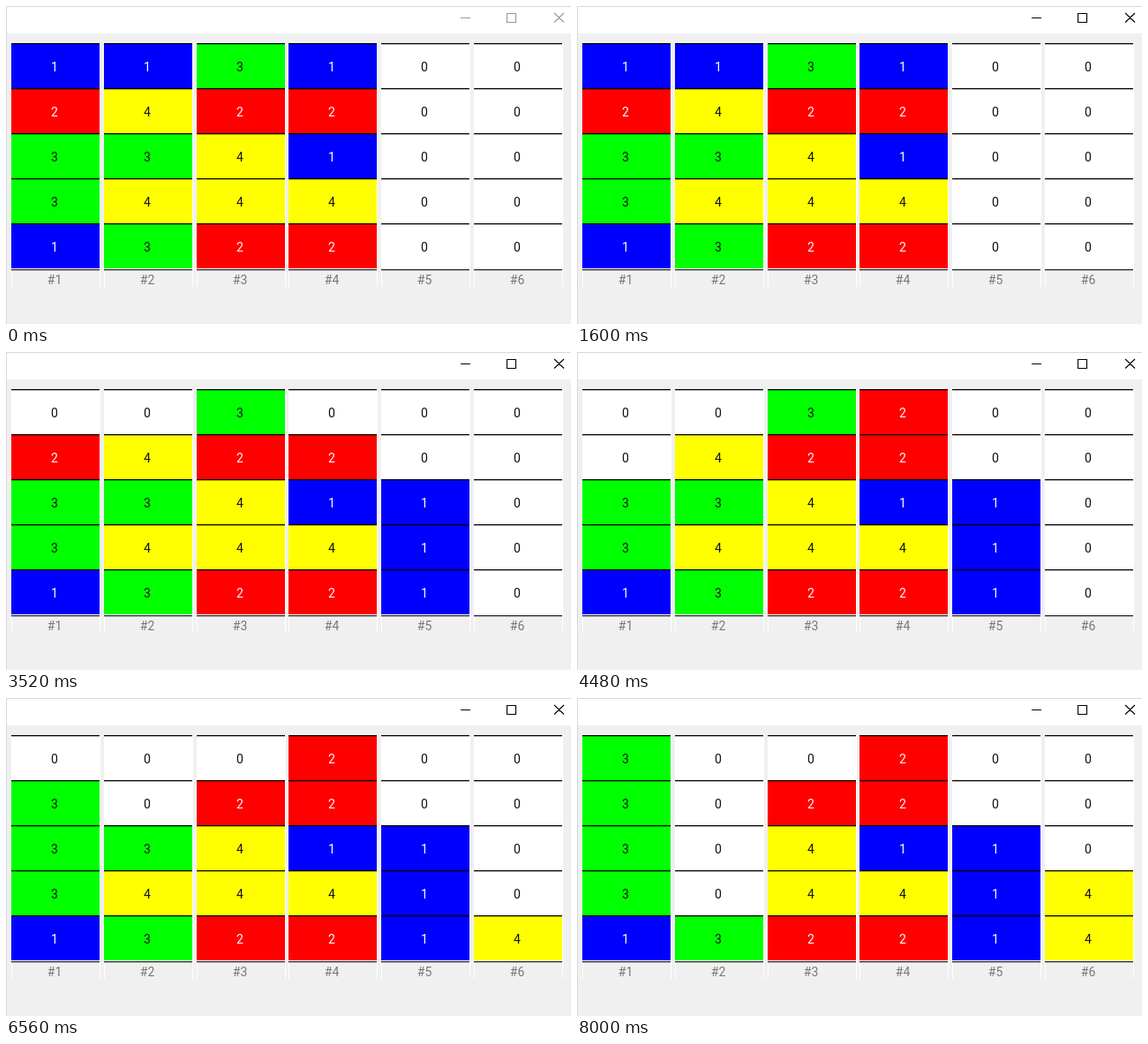
An HTML page with a canvas for the animation above (8080 ms loop, 640 px wide and 360 px high).

```html
<!DOCTYPE html>
<html lang="en">
<head>
<meta charset="utf-8">
<title>Colour sorting tubes</title>
<style>
  html, body { margin: 0; width: 100%; height: 100%; overflow: hidden; background: #f0f0f0; }
  canvas { display: block; }
</style>
</head>
<body>
<canvas id="stage" width="640" height="360"></canvas>
<script>
const ctx = document.getElementById('stage').getContext('2d');

const LOOP = 8080;
const ACTIVATE_AT = 1360;
const ROWS = 5;
const COLORS = ['#fff', '#00f', '#f00', '#0f0', '#ff0'];

// Each tube is listed from top to bottom; 0 is an empty slot.
const START = ['12331', '14343', '32442', '12142', '00000', '00000'];

// [time, source tube, destination tube]
const MOVES = [
  [1680, 0, 4], [2560, 1, 4], [3280, 3, 4], [4080, 0, 3],
  [5040, 1, 5], [5920, 2, 0], [6960, 1, 0], [7680, 1, 5]
];

function tubesAt(time) {
  const tubes = START.map(tube => [...tube].map(Number));
  for (const [at, from, to] of MOVES) {
    if (time < at) break;
    const source = tubes[from].findIndex(value => value > 0);
    const target = tubes[to].lastIndexOf(0);
    tubes[to][target] = tubes[from][source];
    tubes[from][source] = 0;
  }
  return tubes;
}

function rect(x, y, w, h, color) {
  ctx.fillStyle = color;
  ctx.fillRect(x, y, w, h);
}

function label(text, x, y, color) {
  ctx.fillStyle = color;
  ctx.fillText(text, x, y);
}

function drawWindow(active) {
  rect(0, 0, 640, 360, '#f0f0f0');
  rect(0, 0, 640, 31, '#fff');
  rect(0, 0, 640, 1, '#d8d8d8');
  rect(0, 0, 1, 360, '#d8d8d8');

  ctx.strokeStyle = active ? '#000' : '#999';
  ctx.lineWidth = 1.1;
  ctx.beginPath();
  ctx.moveTo(515, 13.5);
  ctx.lineTo(526, 13.5);
  ctx.rect(567.5, 8.5, 10, 10);
  ctx.moveTo(621, 8);
  ctx.lineTo(632, 18.5);
  ctx.moveTo(632, 8);
  ctx.lineTo(621, 18.5);
  ctx.stroke();
}

function drawTube(tube, index) {
  const x = Math.round(6 + index * 104.75);
  const center = x + 49;
  const rowTop = row => Math.round(42 + row * 51.1);

  rect(x, 42, 101, 276, '#fff');
  rect(x + 1, 300, 99, 18, '#f0f0f0');
  tube.forEach((value, row) => {
    const top = rowTop(row);
    const bottom = row === ROWS - 1 ? 297 : rowTop(row + 1);
    rect(x, top, 100, bottom - top, COLORS[value]);
    rect(x, top, 100, 1.3, '#000');
    const light = value === 1 || value === 2;
    label(value, center, top + 31.5, light ? '#fff' : '#111');
  });
  rect(x, 298, 100, 1.3, '#222');
  label('#' + (index + 1), center, 315, '#777');
}

function frame(now) {
  const time = now % LOOP;
  ctx.font = '14px Roboto, sans-serif';
  ctx.textAlign = 'center';
  drawWindow(time >= ACTIVATE_AT);
  tubesAt(time).forEach(drawTube);
  requestAnimationFrame(frame);
}
requestAnimationFrame(frame);
</script>
</body>
</html>
```
